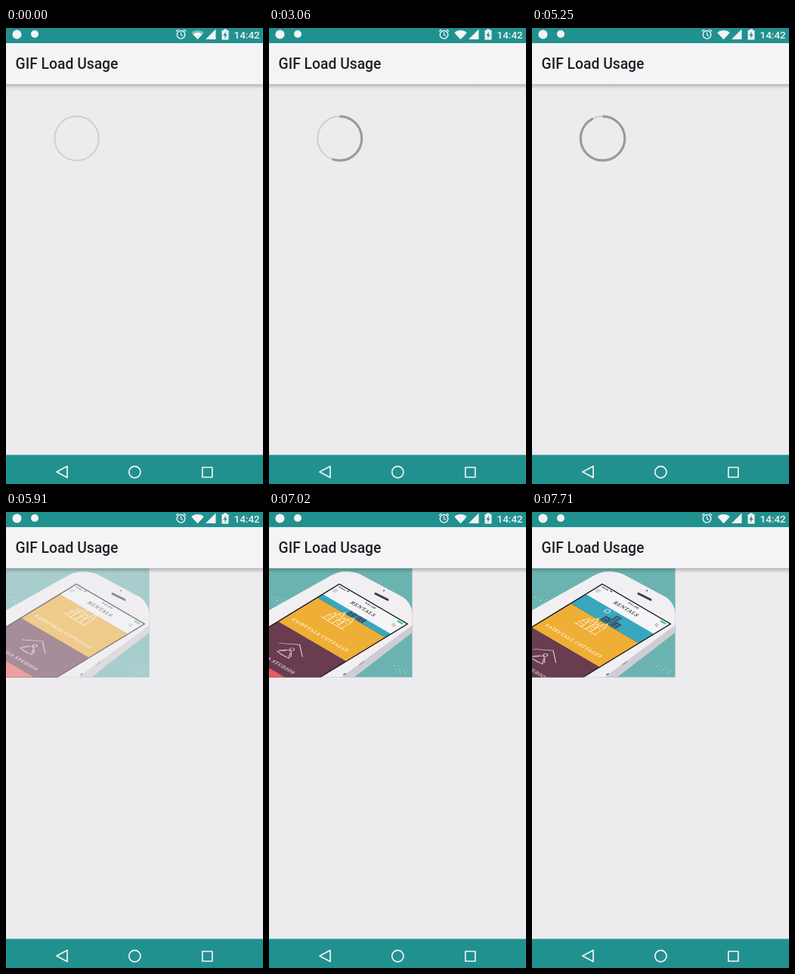
These frames come from a looping animation (340 px wide and 603 px high, 7.74 s). An HTML page with a canvas:

```html
<!DOCTYPE html>
<html lang="en">
<head>
<meta charset="utf-8">
<style>
  html, body { margin: 0; width: 100%; height: 100%; overflow: hidden; background: #edebee; }
  canvas { display: block; }
</style>
</head>
<body>
<canvas width="340" height="603"></canvas>
<script>
const LOOP = 7740, LOADED = 5670;
const BG = '#edebee', TEAL = '#21918f', WHITE = '#f4f3f5';
const SERIF = '"Noto Serif", serif', SANS = 'Roboto, sans-serif';
const ctx = document.querySelector('canvas').getContext('2d');

// 0 before start, 1 after end, linear in between
const ramp = (t, start, end) => Math.min(1, Math.max(0, (t - start) / (end - start)));

// The download starts, stalls, runs fast, then slows down
const progress = t => 13 * ramp(t, 390, 630) + 142 * ramp(t, 780, 2340)
  + 192 * ramp(t, 2340, 5460) + 13 * ramp(t, 5460, LOADED);

function rect(color, x, y, w, h) {
  ctx.fillStyle = color;
  ctx.fillRect(x, y, w, h);
}

function trace(points) {
  ctx.beginPath();
  for (let i = 0; i < points.length; i += 2) ctx.lineTo(points[i], points[i + 1]);
}

function poly(color, ...points) {
  trace(points);
  ctx.fillStyle = color;
  ctx.fill();
}

function line(color, width, ...points) {
  trace(points);
  ctx.strokeStyle = color;
  ctx.lineWidth = width;
  ctx.stroke();
}

function arc(color, width, x, y, r, angle = 360) {
  ctx.beginPath();
  ctx.arc(x, y, r, -Math.PI / 2, (angle / 180 - 0.5) * Math.PI);
  ctx.strokeStyle = color;
  ctx.lineWidth = width;
  ctx.stroke();
}

function dot(color, x, y, r) {
  ctx.beginPath();
  ctx.arc(x, y, r, 0, 7);
  ctx.fillStyle = color;
  ctx.fill();
}

function text(str, x, y, font, color, align = 'left', spacing = 0) {
  ctx.font = font;
  ctx.fillStyle = color;
  ctx.textAlign = align;
  ctx.letterSpacing = spacing + 'px';
  ctx.fillText(str, x, y);
}

function castle(x, y) {
  const c = '#fff3d6', w = 7;
  for (let i = 0; i < 4; i++) {
    const left = x - 2 * w + i * w, top = y - 9 - 7 * (i % 2);
    line(c, 0.9, left, y, left, top, left + w / 2, top - 8, left + w, top, left + w, y);
    line(c, 0.9, left, top, left + w, top);
    line(c, 0.9, left + w / 2, top + 3, left + w / 2, top + 6);
  }
  line(c, 0.9, x - 17, y, x + 17, y);
}

function yoga(x, y) {
  const c = '#e6d5dd';
  line(c, 0.9, x - 18, y, x, y - 14, x + 18, y);
  arc(c, 0.9, x, y - 2, 2.4);
  for (const side of [-1, 1]) {
    line(c, 0.9, x, y + 1, x + side * 4, y + 3, x + side * 9, y + 9);
    line(c, 0.9, x + side * 3, y + 4, x + side * 9, y + 12, x - side * 4, y + 13);
  }
}

function seaside() {
  rect('#38a7be', 0, -68, 104, 68);
  arc('#d8eff2', 1, 38, -18, 3);
  for (let i = 0; i < 3; i++) {
    const x = 43 + i * 8, h = 11 + 9 * (i % 2);
    rect(i % 2 ? '#34637c' : '#2d566e', x, -h, 8, h - 1);
    for (let y = 3; y < h - 3; y += 4) rect('#6fa9ba', x + 2, y - h, 4, 1);
  }
}

function label(str, y, color) {
  text(str, 50, y, 'bold 6.7px ' + SERIF, color, 'center', 0.5);
}

function list() {
  seaside();
  rect('#efae36', 0, 0, 104, 62);
  castle(44, 22);
  label('FAIRYTALE COTTAGES', 49, '#fff0cd');
  rect('#693c50', 0, 61, 104, 69);
  yoga(46, 89);
  label('YOGA STUDIOS', 119, '#e6d5dd');
  rect('#ec5b5c', 0, 129, 104, 80);
}

function screenHeader() {
  rect('#f5f4f6', 0, 0, 103, 25);
  for (let i = 0; i < 5; i++) dot('#333', 3 + i * 2, 3, 0.8);
  rect('#333', 14, 1.5, 3, 1.2);
  text('9:41 AM', 51, 5, 'bold 4px ' + SANS, '#444', 'center');
  rect('#58c878', 92, 1.5, 8, 3);
  for (let i = 0; i < 3; i++) rect('#999', 1.5, 8.6 + i * 2.2, 5.5, 0.8);
  text('RENTALS', 50, 16, 'bold 7px ' + SERIF, '#4a464e', 'center', 0.5);
  arc('#999', 0.8, 94, 11, 1.8);
  line('#999', 0.8, 95.3, 12.3, 97, 14);
}

function screen(scroll) {
  ctx.save();
  ctx.transform(0.864, 0.505, -0.845, 0.515, 93, 96);
  rect('#1c1a20', -1.5, -1.5, 106, 230);
  ctx.beginPath();
  ctx.rect(0, 0, 103, 230);
  ctx.clip();
  ctx.save();
  ctx.translate(0, 25 + scroll);
  list();
  ctx.restore();
  screenHeader();
  ctx.restore();
}

function sparkle(x, y) {
  for (let i = 0; i < 14; i++) rect('#b4dad8', x + (i * 7) % 19, y + (i * 5) % 11, 1, 1);
}

function handset() {
  poly('#cfcdd3', 190, 140, 190, 159, 112, 219, 60, 219);
  ctx.beginPath();
  ctx.moveTo(0, 130);
  ctx.lineTo(82, 84);
  ctx.quadraticCurveTo(99, 74, 120, 82);
  ctx.lineTo(178, 113);
  ctx.quadraticCurveTo(194, 125, 189, 150);
  ctx.lineTo(95, 219);
  ctx.lineTo(0, 219);
  ctx.fillStyle = '#f1eff2';
  ctx.fill();
  ctx.lineCap = 'round';
  line('#3c3a42', 3, 141, 108, 157, 116);
  line('#8b8892', 2, 99, 215, 101, 214);
  line('#aaa7b0', 2, 120, 202, 125, 198);
  ctx.lineCap = 'butt';
  dot('#55525c', 152, 104, 1.1);
}

function photo(t) {
  ctx.save();
  ctx.beginPath();
  ctx.rect(0, 74, 189.5, 144.5);
  ctx.clip();
  rect('#6bb3b1', 0, 74, 190, 145);
  sparkle(3, 112);
  sparkle(165, 203);
  handset();
  screen(24 * ramp(t, 6600, 7710));
  ctx.globalAlpha = 1 - ramp(t, LOADED, 6120);
  rect(BG, 0, 74, 190, 145);
  ctx.restore();
}

function loader(angle) {
  arc('#d0ced1', 2, 93.5, 146, 29.2);
  if (angle) arc('#9c9a9d', 3.2, 93.5, 146, 29.2, angle);
}

function wedge(color, r) {
  ctx.beginPath();
  ctx.moveTo(253.5, 15);
  ctx.arc(253.5, 15, r, -Math.PI * 0.74, -Math.PI * 0.26);
  ctx.fillStyle = color;
  ctx.fill();
}

function statusBar(t) {
  rect(TEAL, 0, 0, 340, 20.5);
  dot(WHITE, 14.5, 8.5, 6);
  dot(WHITE, 38, 8, 5);
  arc(WHITE, 1.4, 231.5, 8.8, 5.3);
  line(WHITE, 1.2, 231.5, 5.5, 231.5, 9, 234, 10.5);
  for (const side of [-1, 1]) {
    line(WHITE, 1.4, 231.5 + side * 3.5, 2, 231.5 + side * 6.5, 4.5);
  }
  wedge(t < 1200 ? '#7fbfbd' : WHITE, 12);
  wedge(WHITE, 9);
  poly(WHITE, 264, 15, 277.5, 15, 277.5, 1.5);
  rect(WHITE, 285.5, 3, 9, 12.5);
  rect(WHITE, 288, 1.5, 4, 2);
  poly(TEAL, 291, 4.5, 287.3, 10, 289.6, 10, 289, 14, 292.7, 8.5, 290.4, 8.5);
  text('14:42', 301.5, 13.6, '500 13.5px ' + SANS, WHITE);
}

function appBar() {
  const shade = ctx.createLinearGradient(0, 74, 0, 81);
  shade.addColorStop(0, 'rgba(0,0,0,.28)');
  shade.addColorStop(0.5, 'rgba(0,0,0,.1)');
  shade.addColorStop(1, 'rgba(0,0,0,0)');
  rect(shade, 0, 74, 340, 7);
  rect(WHITE, 0, 20, 340, 54.4);
  text('GIF Load Usage', 12.6, 54.2, '500 19.3px ' + SANS, '#212024');
}

function navBar() {
  rect(TEAL, 0, 564.5, 340, 39);
  ctx.lineJoin = 'round';
  line(WHITE, 1.7, 81, 587, 81, 579.5, 67, 587, 81, 594.5, 81, 587);
  ctx.strokeRect(259.8, 581, 13, 13);
  ctx.lineJoin = 'miter';
  arc(WHITE, 1.7, 170.3, 587.2, 7.6);
}

function draw(now) {
  const t = now % LOOP;
  rect(BG, 0, 0, 340, 603);
  if (t < LOADED) loader(progress(t));
  else photo(t);
  statusBar(t);
  appBar();
  navBar();
}

const start = performance.now();
function tick() {
  draw(performance.now() - start);
  requestAnimationFrame(tick);
}
tick();
</script>
</body>
</html>
```
